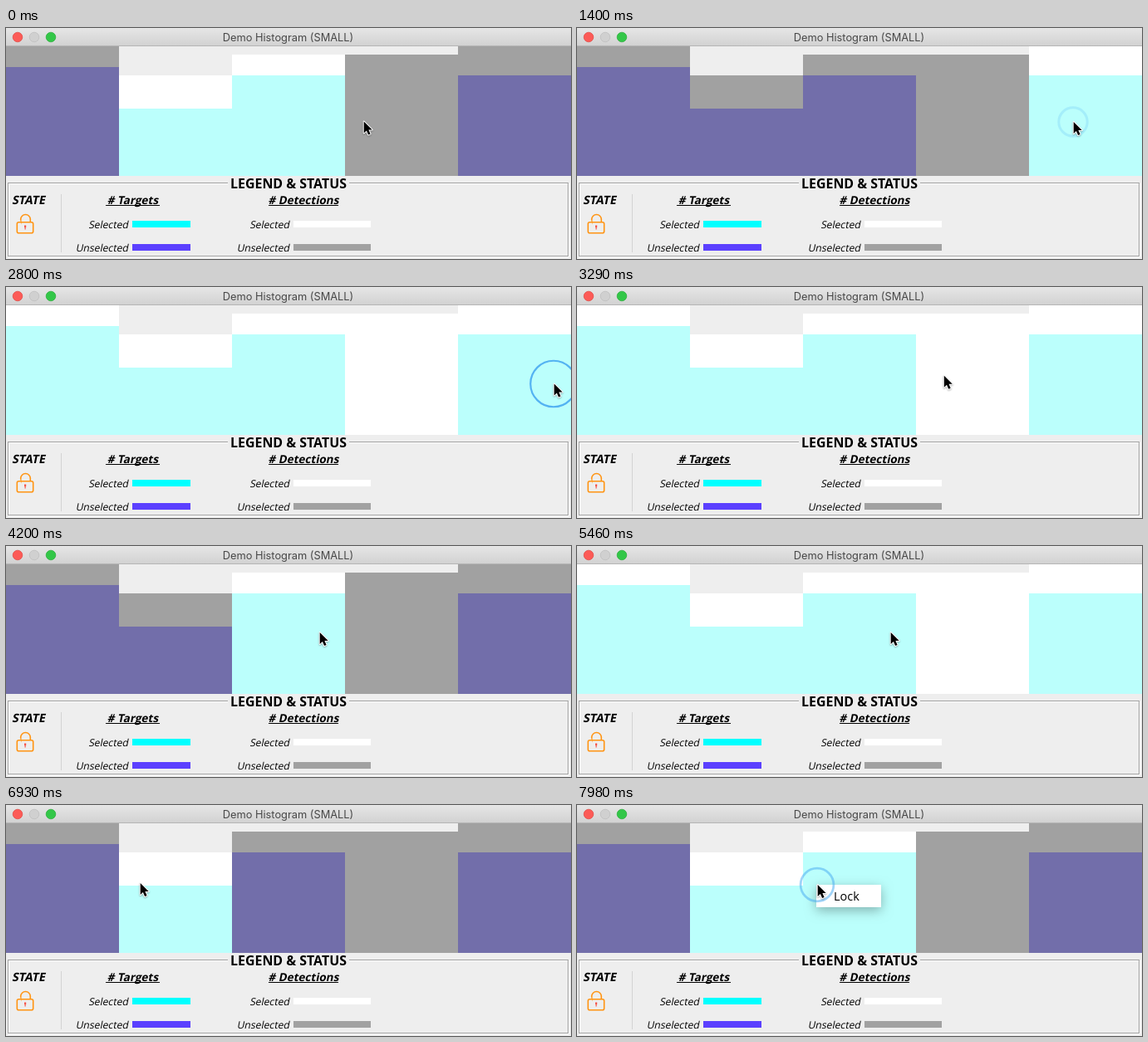
Recreate the animation shown at these times as an HTML page with a canvas. Size 680 px wide and 278 px high, loop 8000 ms.

```html
<!DOCTYPE html>
<html>
<head>
<meta charset="utf-8">
<style>
html, body { margin: 0; width: 100%; height: 100%; overflow: hidden; background: #eee; }
canvas { display: block; }
</style>
</head>
<body>
<canvas id="stage" width="680" height="278"></canvas>
<script>
const ctx = document.getElementById('stage').getContext('2d');
const LOOP = 8000, COL = 136, BASE = 178;
const UI = '"Open Sans", "Noto Sans", sans-serif';

// top edges of each column: detections, targets
const bars = [[22, 47], [57, 97], [32, 57], [32, BASE], [22, 57]];

// time from which these columns are selected
const selections = [
  [0, [1, 2]], [1390, [4]], [2590, [0, 1, 2, 3, 4]], [3500, [2]],
  [5110, [0, 1, 2, 3, 4]], [5740, []], [6580, [1]], [7350, [1, 2]]
];

// start, end, target x, target y
const start = [430, 111.5];
const moves = [
  [70, 770, 597, 112], [1750, 2450, 659, 115.5], [2980, 3430, 377, 103],
  [5670, 6160, 161, 93], [6930, 7280, 289, 95]
];
const clicks = [1390, 2555, 3500, 5110, 6580, 7350, 7910];
const RING_LIFE = 350;

const clamp = v => Math.max(0, Math.min(1, v));
const ease = v => v * v * (3 - 2 * v);

function rect(x, y, w, h, color) {
  ctx.fillStyle = color;
  ctx.fillRect(x, y, w, h);
}

function disc(x, y, r, color, edge) {
  ctx.beginPath();
  ctx.arc(x, y, r, 0, Math.PI * 2);
  ctx.fillStyle = color;
  ctx.fill();
  ctx.strokeStyle = edge;
  ctx.lineWidth = 0.7;
  ctx.stroke();
}

function text(str, x, y, font, color = '#000', align = 'left', slant = 0) {
  ctx.save();
  ctx.transform(1, 0, -slant, 1, x, y);
  ctx.font = font;
  ctx.fillStyle = color;
  ctx.textAlign = align;
  ctx.fillText(str, 0, 0);
  ctx.restore();
}

function titleBar() {
  const g = ctx.createLinearGradient(0, 0, 0, 21);
  g.addColorStop(0, '#e6e6e6');
  g.addColorStop(1, '#d2d2d2');
  rect(0, 0, 680, 22, g);
  rect(0, 21, 680, 1, '#b5b5b5');
  disc(14, 11, 5.8, '#fc5b57', '#e0443e');
  disc(34, 11, 5.8, '#d0d0d0', '#bcbcbc');
  disc(54, 11, 5.8, '#33c748', '#24ab35');
  text('Demo Histogram (SMALL)', 339.5, 16, '12.8px Inter, Roboto, sans-serif', '#484848', 'center');
}

function chart(t) {
  let picked = [];
  for (const [from, cols] of selections) if (t >= from) picked = cols;
  bars.forEach(([det, tar], i) => {
    const on = picked.includes(i);
    rect(i * COL, det, COL, tar - det, on ? '#fff' : '#a1a1a1');
    rect(i * COL, tar, COL, BASE - tar, on ? '#bbfffc' : '#726eaa');
  });
}

function padlock() {
  ctx.strokeStyle = '#ff9412';
  ctx.lineWidth = 1.6;
  ctx.beginPath();
  ctx.roundRect(13.3, 233.8, 19.4, 13, 2);
  ctx.moveTo(17.5, 229.5);
  ctx.arc(23.5, 230.3, 5.8, Math.PI, 0);
  ctx.lineTo(29.3, 233.8);
  ctx.stroke();
  rect(22, 237.5, 2.2, 2.5, '#f5554a');
  rect(22.5, 240, 1.2, 2.5, '#f5554a');
}

function legend() {
  ctx.lineWidth = 1;
  ctx.strokeStyle = '#fff';
  ctx.strokeRect(3.5, 187.5, 674, 88);
  ctx.strokeStyle = '#a0a0a0';
  ctx.strokeRect(2.5, 186.5, 674, 88);
  rect(267, 180, 146, 15, '#eee');
  text('LEGEND & STATUS', 340, 193, `bold 15.9px ${UI}`, '#000', 'center');
  rect(66, 200, 1, 70, '#d3d3d3');

  const head = `bold 13.5px ${UI}`, body = `12.2px ${UI}`;
  text('STATE', 7, 212, `bold 14.2px ${UI}`, '#000', 'left', 0.2);
  padlock();
  const groups = [
    ['# Targets', 120, 65, 152, 70, '#0ff', '#5b40ff'],
    ['# Detections', 316, 84, 346, 93, '#fff', '#a1a1a1']
  ];
  for (const [name, x, line, bx, bw, on, off] of groups) {
    text(name, x + line / 2, 212, head, '#000', 'center', 0.2);
    rect(x, 213, line, 1, '#000');
    text('Selected', bx - 5, 241, body, '#000', 'right', 0.2);
    text('Unselected', bx - 5, 269, body, '#000', 'right', 0.2);
    rect(bx, 232, bw, 8, on);
    rect(bx, 260, bw, 8, off);
  }
}

function menu() {
  ctx.save();
  ctx.shadowColor = 'rgba(0,0,0,.3)';
  ctx.shadowBlur = 14;
  ctx.shadowOffsetY = 4;
  rect(288, 96, 78, 27, '#fff');
  ctx.restore();
  text('Lock', 309, 115, `14.5px ${UI}`);
}

function pointerAt(t) {
  let [x, y] = start;
  for (const [a, b, tx, ty] of moves) {
    const k = ease(clamp((t - a) / (b - a)));
    x += (tx - x) * k;
    y += (ty - y) * k;
  }
  return [x, y];
}

function ring(t, x, y) {
  for (const c of clicks) {
    const age = t - c;
    if (age < 0 || age >= RING_LIFE) continue;
    const fade = clamp((RING_LIFE - age) / 70);
    ctx.globalAlpha = Math.min(0.15 + age * 0.0055, 0.95) * fade;
    ctx.strokeStyle = '#4faef2';
    ctx.lineWidth = 3 - age / 300;
    ctx.beginPath();
    ctx.arc(x, y + 1, 16.7 + age * 0.045, 0, Math.PI * 2);
    ctx.stroke();
    ctx.globalAlpha = 1;
  }
}

function pointer(x, y) {
  ctx.save();
  ctx.translate(x, y);
  ctx.beginPath();
  ctx.moveTo(0.7, 1);
  [[0.7, 15], [3.9, 12], [6.1, 17], [8.6, 15.9], [6.4, 11], [10.7, 10.9]]
    .forEach(p => ctx.lineTo(...p));
  ctx.closePath();
  ctx.lineJoin = 'round';
  ctx.shadowColor = 'rgba(0,0,0,.3)';
  ctx.shadowBlur = 2;
  ctx.shadowOffsetY = 1;
  ctx.strokeStyle = '#fff';
  ctx.lineWidth = 2;
  ctx.stroke();
  ctx.shadowColor = 'transparent';
  ctx.fillStyle = '#000';
  ctx.fill();
  ctx.restore();
}

function draw(t) {
  rect(0, 0, 680, 278, '#eee');
  chart(t);
  titleBar();
  legend();
  if (t >= 7945) menu();
  const [x, y] = pointerAt(t);
  ring(t, x, y);
  pointer(x, y);
}

const t0 = performance.now();
function frame() {
  draw((performance.now() - t0) % LOOP);
  requestAnimationFrame(frame);
}
frame();
</script>
</body>
</html>
```
